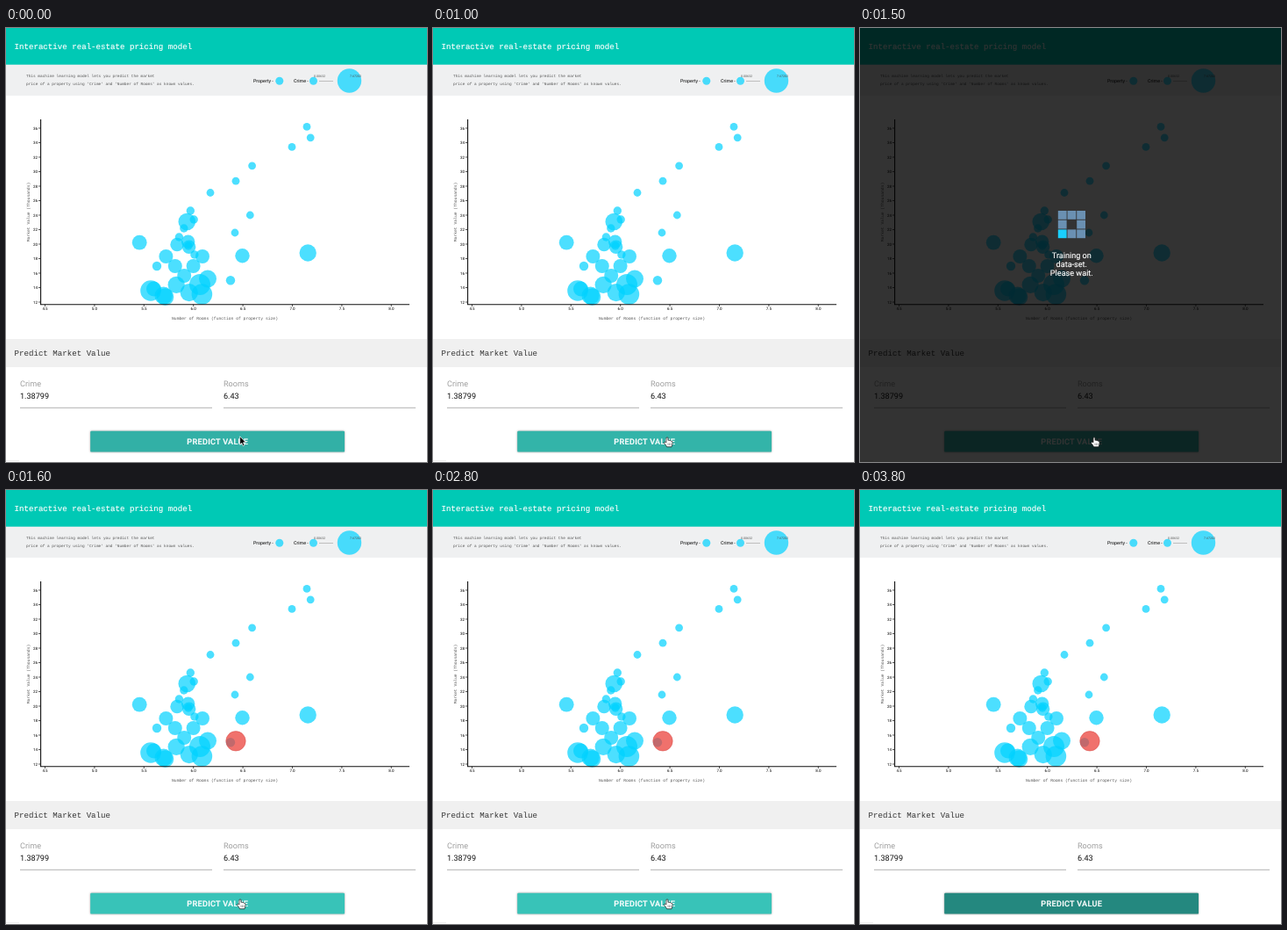
These frames come from a looping animation (480x494 px, 3900 ms). An HTML page:

```html
<!DOCTYPE html>
<html lang="en">
<head>
<meta charset="utf-8">
<title>Pricing model</title>
<style>
  html, body { margin: 0; width: 100%; height: 100%; overflow: hidden; background: #fff; }
  svg { display: block; width: 480px; height: 494px; font: 9.1px Roboto, sans-serif; text-rendering: geometricPrecision; }
  .mono { font-family: "Liberation Mono", monospace; }
  .mid { text-anchor: middle; }
  .end { text-anchor: end; }
  .axis { fill: none; stroke: #111; }
  .dots { fill: #00d1ff; fill-opacity: .7; }
  #button { filter: drop-shadow(0 .8px 1px rgba(0, 0, 0, .4)); }
</style>
</head>
<body>
<svg viewBox="0 0 480 494">
  <rect y="41" width="480" height="36" fill="#eff0f1"/>
  <rect width="480" height="41.7" fill="#00c9b5"/>
  <text class="mono" x="9.5" y="24" font-size="9.15" fill="#fff" stroke="#fff" stroke-width=".15">Interactive real-estate pricing model</text>

  <g class="mono" font-size="4.45" fill="#555">
    <text x="23" y="56.3">This machine learning model lets you predict the market</text>
    <text x="23" y="64.8">price of a property using 'Crime' and 'Number of Rooms' as known values.</text>
  </g>
  <g font-size="5.3">
    <text x="282" y="62">Property -</text>
    <text x="328" y="62">Crime -</text>
  </g>
  <path d="M357 60.5H373" stroke="#aaa" stroke-width=".7"/>
  <g class="dots">
    <circle cx="311.8" cy="60.2" r="4.5"/>
    <circle cx="350.5" cy="60.3" r="4.5"/>
    <circle cx="391.5" cy="60" r="13.7"/>
  </g>
  <g font-size="3.6" fill="#555">
    <text x="351" y="55.5">0.00632</text>
    <text x="392" y="55.5">7.67202</text>
  </g>

  <g id="dots" class="dots"></g>
  <circle id="prediction" cx="262" cy="285.8" r="11.2" fill="#eb3f38" fill-opacity=".74" stroke="#d9534f" stroke-opacity=".7" stroke-width=".8"/>
  <path class="axis" d="M39.6 104V314.7H460" stroke-width="1.1"/>
  <g id="ticks" font-size="4.5"></g>
  <g class="mono mid" font-size="4.69" fill="#555">
    <text x="249.5" y="331.5">Number of Rooms (function of property size)</text>
    <text transform="translate(26.5 209.5) rotate(-90)">Market Value (Thousands)</text>
  </g>

  <rect y="354" width="480" height="32" fill="#f0f0f0"/>
  <text class="mono" x="9.5" y="373.3" font-size="9.15" fill="#333">Predict Market Value</text>
  <g fill="#9e9e9e">
    <text x="16" y="408.3">Crime</text>
    <text x="248" y="408.3">Rooms</text>
  </g>
  <text x="16" y="421.6" fill="#111">1.38799</text>
  <text x="248" y="421.6" fill="#111">6.43</text>
  <path d="M16 432.3H235M248 432.3H467" stroke="#9e9e9e" stroke-width=".8"/>
  <rect id="button" x="96.2" y="458.8" width="289.8" height="23.8" rx="1.2"/>
  <text class="mid" x="241.3" y="473.8" fill="#fff" stroke="#fff" stroke-width=".2" font-weight="500" letter-spacing=".3">PREDICT VALUE</text>
  <path d="M0 492.5H15" stroke="#eee"/>

  <g id="overlay">
    <rect width="480" height="494" fill-opacity=".8"/>
    <g id="loader"></g>
    <g class="mid" fill="#fff" stroke="#fff" stroke-width=".15">
      <text x="241.3" y="262">Training on</text>
      <text x="241.3" y="272">data-set.</text>
      <text x="241.3" y="282">Please wait.</text>
    </g>
  </g>

  <path id="arrow" d="M266.7 464.8V474.3L268.8 472.4L270.2 475.7L271.9 475L270.5 471.8H273.4Z" fill="#000" stroke="#fff" stroke-width=".7"/>
  <g id="hand" stroke="#111" stroke-width=".7" stroke-linejoin="round">
    <path fill="#fff" d="M266 471.8V467Q266 465.8 267 465.8T268 467V469.3Q269.3 468.7 269.8 469.7Q271 469.2 271.5 470.3Q273 470 273 471.6V473.5Q272.8 475 272 476.8H266.6Q265.6 474.7 263.7 472.7Q263.2 471.3 264.4 471.2Q265.2 471.2 266 471.8Z"/>
    <path fill="none" stroke-width=".4" d="M268 472.5V475M269.6 472.5V475M271.2 472.5V475"/>
  </g>
</svg>
<script>
const LOOP = 3900, STEP = 100;
const TRAIN = 1100, RESULT = 1600, LEAVE = 3400;
const { sin, cos, PI, min, max } = Math;
const $ = id => document.getElementById(id);

function add(parent, tag, attrs, text = '') {
  const node = document.createElementNS('http://www.w3.org/2000/svg', tag);
  for (const key in attrs) node.setAttribute(key, attrs[key]);
  node.textContent = text;
  parent.append(node);
  return node;
}

const dot = (cx, cy, r = 4.4) => add($('dots'), 'circle', { cx, cy, r });
const series = (count, rule) => { for (let i = 0; i < count; i++) dot(...rule(i)); };

// Stand-alone properties: x, y and, for higher crime, a radius
[
  [343, 112.4], [347.2, 124.8], [326, 135.4], [280.6, 156.8], [262, 174.2], [233, 187.5], [278.3, 213], [261, 233],
  [344.2, 256, 9.7], [269.5, 259.2, 8.2], [152.2, 244.2, 8.4], [206.3, 220.5, 9.8], [256, 287.3, 5.2],
  [221, 292, 12], [230, 285.5, 10]
].forEach(point => dot(...point));

// Dense area, from the small upper column to the large bottom row
series(6, i => [206 + 9 * sin(1.5 * i + .5), 208 + 10 * i, 4.7]);
series(3, i => [195 + 15 * sin(i), 246.5 - 3.7 * sin(2 * i), 7.7]);
series(6, i => [172 + 10.4 * i, 271 + 11 * cos((i - 3) * PI / 2), min(8, 5.2 + 3 * i)]);
series(5, i => [165 + 14.6 * i, 299 + 7 * sin(2.2 * i), 9.6 + .55 * (i - 2) ** 2]);
series(2, i => [168.5 + 13 * i, 297 + 9 * i, 8.5 + 1.3 * i]);

for (let value = 12; value <= 36; value += 2) {
  const y = 312 - (value - 12) * 8.25;
  add($('ticks'), 'path', { class: 'axis', d: `M37 ${y}h2.5`, 'stroke-width': .7 });
  add($('ticks'), 'text', { class: 'end', x: 36, y: y + 1.6 }, value);
}
for (let value = 4.5; value <= 8; value += .5) {
  const x = 44.5 + (value - 4.5) * 112.8;
  add($('ticks'), 'path', { class: 'axis', d: `M${x} 314.5v2.5`, 'stroke-width': .7 });
  add($('ticks'), 'text', { class: 'mid', x, y: 321.3 }, value.toFixed(1));
}

// Ring of eight loader cells, clockwise from the top right
const cells = Array.from({ length: 8 }, (_, i) => {
  const angle = (i - 1) * PI / 4;
  return add($('loader'), 'rect', {
    x: 236.5 + 10.7 * Math.round(cos(angle)), y: 218.7 + 10.7 * Math.round(sin(angle)), width: 9.8, height: 9.8
  });
});

function buttonColor(t) {
  const glow = t < TRAIN ? .68 + t / 16000
    : t < RESULT ? .45 + (t - TRAIN) / 1000
    : 1 - max(0, min(1, (t - LEAVE) / 200));
  return `rgb(${36 + 20 * glow}, ${136 + 59 * glow}, ${127 + 57 * glow})`;
}

const show = (id, on) => $(id).style.display = on ? '' : 'none';

function draw() {
  const t = Math.floor(performance.now() % LOOP / STEP) * STEP;
  show('arrow', t < 200);
  show('hand', t >= 200 && t < LEAVE);
  show('overlay', t >= TRAIN && t < RESULT);
  show('prediction', t >= RESULT);
  $('button').setAttribute('fill', buttonColor(t));
  const active = (t - TRAIN) / STEP;
  cells.forEach((cell, i) => cell.setAttribute('fill', i === active ? '#1acfff' : '#6a90b2'));
  requestAnimationFrame(draw);
}
draw();
</script>
</body>
</html>
```
